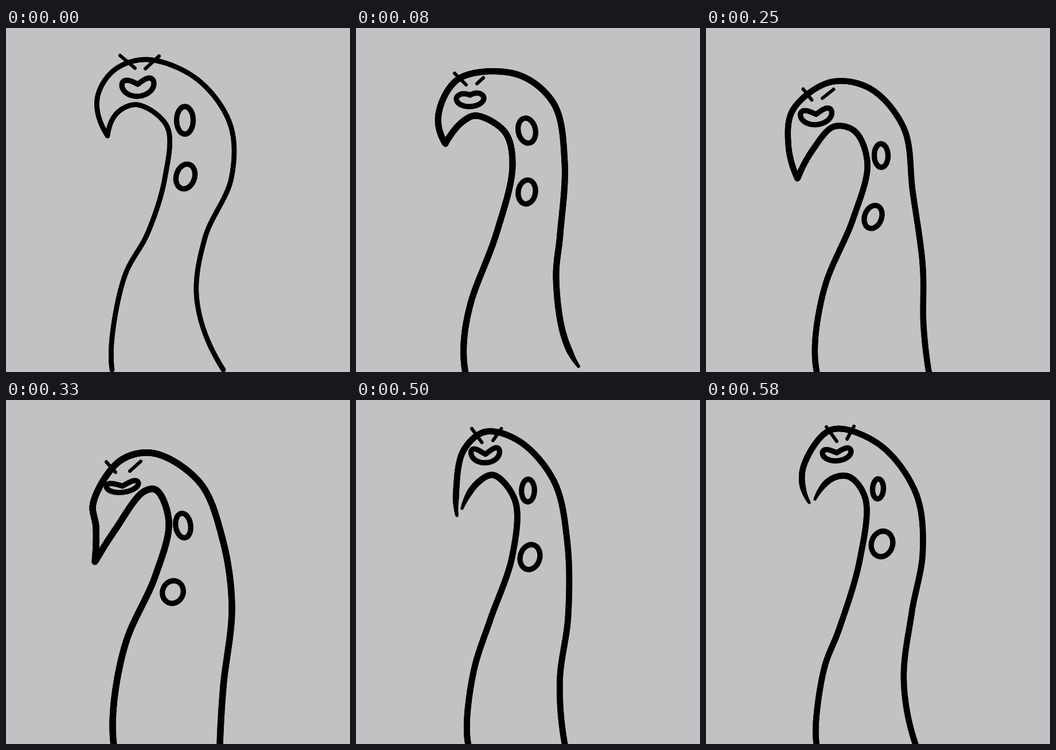
Recreate the animation shown at these times as an HTML page with a canvas. Size 600 by 600 pixels, loop 660 ms.

```html
<!DOCTYPE html>
<html lang="en">
<head>
<meta charset="utf-8">
<title>Wobbling tentacle</title>
<style>
  html, body { margin: 0; width: 100%; height: 100%; overflow: hidden; background: #c3c1c3; }
  canvas { display: block; width: 100vmin; height: 100vmin; }
</style>
</head>
<body>
<canvas id="stage" width="600" height="600"></canvas>
<script>
const ctx = document.getElementById('stage').getContext('2d');
const markWidth = 9.3, browWidth = 6;

// outer, inner: key points from beak tip to base
// mouth: x, y, half width, dip of upper lip, depth, tilt
// spots: x, y, rx, ry, tilt; brows: from, to
const upright = {
  width: 8.6,
  outer: [177,188, 159,124, 188,74, 246,55, 333,89, 391,168, 393,262, 347,366, 333,475, 379,596],
  inner: [177,188, 195,147, 230,134, 281,172, 277,262, 247,358, 208,430, 185,540, 185,596],
  mouth: [230, 98, 28, 0, 21, -0.1],
  spots: [[312, 161, 14.5, 24, 0], [313, 259, 16, 22, 0.3]],
  brows: [[199,48, 225,70], [267,49, 243,71]]
};
const stooped = {
  width: 11,
  outer: [156,202, 144,150, 180,88, 281,81, 345,132, 364,235, 356,360, 349,435, 362,535, 388,590],
  inner: [156,201, 189,161, 211,153, 260,182, 273,240, 245,358, 200,480, 188,550, 191,602],
  mouth: [199, 123, 24, -6, 14, -0.05],
  spots: [[298, 179, 15, 22, -0.2], [298, 286, 15, 21, 0.15]],
  brows: [[172,79, 192,99], [222,87, 211,97]]
};
const leaning = {
  width: 9.5,
  outer: [164,243, 130,182, 151,106, 234,83, 314,118, 352,205, 344,330, 362,470, 380,540, 405,602],
  inner: [165,241, 183,197, 206,184, 257,203, 279,260, 253,358, 207,474, 193,560, 198,595],
  mouth: [181, 151, 27, 0, 25, -0.1],
  spots: [[302, 226, 11, 19.5, 0.1], [292, 324, 11.5, 21.5, 0.3]],
  brows: [[164,105, 178,125], [210,107, 190,121]]
};
const drooping = {
  width: 11.4,
  outer: [155,282, 157,222, 152,180, 199,106, 258,93, 338,144, 377,240, 394,360, 379,500, 373,602],
  inner: [156,281, 190,227, 240,160, 262,157, 284,212, 260,308, 210,420, 188,530, 188,602],
  mouth: [203, 148, 28, 2, 13, -0.12],
  spots: [[309, 219, 13, 21.5, -0.15], [291, 335, 18, 20, 0.4]],
  brows: [[175,108, 191,126], [235,107, 216,124]]
};
const rising = {
  width: 11,
  outer: [172,224, 181,200, 169,118, 216,61, 262,62, 324,119, 359,230, 381,385, 366,490, 363,602],
  inner: [180,205, 205,151, 230,128, 277,179, 277,265, 235,370, 206,470, 195,560, 199,602],
  mouth: [223, 91, 25, 6, 22, -0.03],
  spots: [[300, 161, 13, 22, 0], [300, 297, 15.5, 21.5, 0.25]],
  brows: [[194,53, 211,76], [249,54, 232,73]]
};
const curling = {
  width: 10.5,
  outer: [180,179, 168,125, 205,60, 234,50, 308,82, 367,165, 378,265, 359,370, 345,490, 366,602],
  inner: [190,173, 220,137, 250,134, 278,172, 268,280, 232,400, 207,465, 192,560, 193,602],
  mouth: [228, 91, 25, 1, 15, -0.08],
  spots: [[300, 155, 9.5, 17.5, 0.05], [307, 251, 18.5, 22.5, 0.3]],
  brows: [[210,47, 228,72], [258,46, 246,68]]
};

function blend(a, b) {
  if (typeof a === 'number') return (a + b) / 2;
  if (Array.isArray(a)) return a.map((v, i) => blend(v, b[i]));
  return Object.fromEntries(Object.keys(a).map(k => [k, blend(a[k], b[k])]));
}

const steps = [
  [80, upright], [170, stooped], [250, leaning], [330, blend(leaning, drooping)],
  [420, drooping], [500, rising], [580, blend(rising, curling)], [660, curling]
];

const gap = (a, b) => Math.hypot(a[0] - b[0], a[1] - b[1]);

function pairs(flat) {
  return Array.from({ length: flat.length / 2 }, (_, i) => flat.slice(2 * i, 2 * i + 2));
}

// Centripetal Catmull-Rom, so uneven key points still give smooth curves
function smooth(points) {
  const last = points.length - 1, out = [];
  const slopes = points.map((q, i) => {
    const p = points[Math.max(0, i - 1)], r = points[Math.min(last, i + 1)];
    const a = Math.sqrt(gap(p, q)), b = Math.sqrt(gap(q, r));
    return [0, 1].map(d => {
      const before = a && (q[d] - p[d]) / a, after = b && (r[d] - q[d]) / b;
      return (before * b + after * a) / (a + b);
    });
  });
  // A free end follows a parabola through its neighbour
  for (const [end, next] of [[0, 1], [last, last - 1]]) {
    const span = Math.sqrt(gap(points[end], points[next])) * Math.sign(next - end);
    slopes[end] = [0, 1].map(d => 2 * (points[next][d] - points[end][d]) / span - slopes[next][d]);
  }
  for (let i = 0; i < last; i++) {
    const h = Math.sqrt(gap(points[i], points[i + 1]));
    for (let t = 0; t < 1; t += 1 / 24) {
      const s = 1 - t;
      out.push([0, 1].map(d =>
        s * s * (1 + 2 * t) * points[i][d] + t * t * (1 + 2 * s) * points[i + 1][d] +
        h * s * t * (s * slopes[i][d] - t * slopes[i + 1][d])));
    }
  }
  return [...out, points[last]];
}

function brush(points, width, thinStart, thinEnd) {
  const first = points[0], last = points[points.length - 1];
  const grow = distance => Math.min(1, 0.5 + distance / 60);
  for (let i = 1; i < points.length; i++) {
    const p = points[i - 1], q = points[i];
    ctx.lineWidth = width * (thinStart ? grow(gap(p, first)) : 1) * (thinEnd ? grow(gap(q, last)) : 1);
    ctx.beginPath();
    ctx.moveTo(...p);
    ctx.lineTo(...q);
    ctx.stroke();
  }
}

function body(pose) {
  const outer = pairs(pose.outer), inner = pairs(pose.inner);
  const openBeak = gap(outer[0], inner[0]) > 5;
  for (const side of [outer, inner]) {
    const onStage = side[side.length - 1][1] < 596;
    brush(smooth(side), pose.width, openBeak, onStage);
  }
}

function mouth([x, y, w, dip, depth, tilt]) {
  ctx.save();
  ctx.translate(x, y);
  ctx.rotate(tilt);
  ctx.lineWidth = markWidth;
  ctx.beginPath();
  for (let i = 0; i < 60; i++) {
    const a = i / 30 * Math.PI, s = Math.abs(Math.sin(a));
    const upper = dip * s ** 3 - 0.42 * depth * Math.abs(Math.sin(2 * a));
    ctx.lineTo(w * Math.cos(a), i < 30 ? depth * s : upper);
  }
  ctx.closePath();
  ctx.stroke();
  ctx.restore();
}

function spot([x, y, rx, ry, tilt]) {
  ctx.lineWidth = markWidth;
  ctx.beginPath();
  ctx.ellipse(x, y, rx, ry, tilt, 0, 2 * Math.PI);
  ctx.stroke();
}

function brow([x1, y1, x2, y2]) {
  ctx.lineWidth = browWidth;
  ctx.beginPath();
  ctx.moveTo(x1, y1);
  ctx.lineTo(x2, y2);
  ctx.stroke();
}

function draw(pose) {
  ctx.fillStyle = '#c3c1c3';
  ctx.fillRect(0, 0, 600, 600);
  ctx.strokeStyle = '#000';
  ctx.lineCap = ctx.lineJoin = 'round';
  body(pose);
  mouth(pose.mouth);
  pose.spots.forEach(spot);
  pose.brows.forEach(brow);
}

const start = performance.now();
function tick() {
  const t = (performance.now() - start) % 660;
  draw(steps.find(([end]) => t < end)[1]);
  requestAnimationFrame(tick);
}
tick();
</script>
</body>
</html>
```
